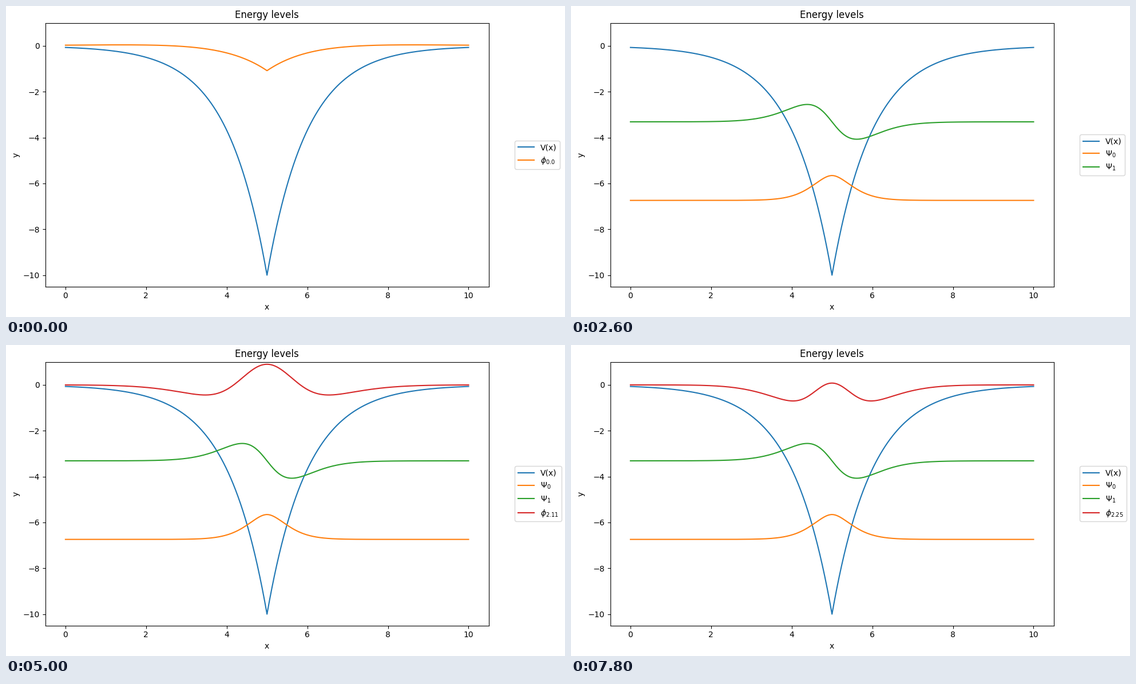
Write a matplotlib script that moves like this. It is 977x545 px and loops after 8000 ms.

```python
import numpy as np
import matplotlib.pyplot as plt
from matplotlib.animation import FuncAnimation

W, H, DPI = 977, 545, 100
FRAMES, STEP = 40, 200
STEPS = 7  # frames spent on each of the first two levels
MID = 5.0

x = np.linspace(0, 10, 501)
s = np.abs(x - MID)
V = -10 * np.exp(-s)


def bound_states(count):
    """Lowest eigenstates of -1/2 d2/dx2 + V in the box, left lobe positive."""
    h = x[1] - x[0]
    off = np.full(len(x) - 3, 0.5 / h**2)
    ham = np.diag(1 / h**2 + V[1:-1]) - np.diag(off, 1) - np.diag(off, -1)
    energy, vec = np.linalg.eigh(ham)
    states = np.zeros((count, len(x)))
    states[:, 1:-1] = vec[:, :count].T / np.sqrt(h)
    left = states[:, :len(x) // 2].sum(axis=1, keepdims=True)
    return energy, states * np.sign(left)


def bells(a, p, b, q):
    """Narrow bell minus a wide one: a central peak between two dips."""
    return a * np.exp(-s**2 / p) - b * np.exp(-s**2 / q)


def ease(u, rate):
    """Exponential ease: out for a positive rate, in for a negative one."""
    return (1 - np.exp(-rate * u)) / (1 - np.exp(-rate))


E, psi = bound_states(2)
guess = -1.2 * (np.exp(-s) - 0.1) * np.exp(-s**2 / 20)
odd_guess = 1.7 * (MID - x) * np.exp(-s)

# start step, shape, easing rate towards the next shape
KEYS = [
    (0, guess, 4),
    (6, bells(1.33, 0.47, 1.47, 1.95), -4.5),
    (11, bells(1.88, 0.835, 0.98, 4.1), 6),
    (18, bells(1.09, 0.372, 1.15, 2.45), 3),
    (25, bells(1.30, 0.422, 1.22, 2.52), 3),
]


def trial(level, k):
    """Trial wave function of a level after k iterations."""
    if level < 2:
        start, end = [(guess, -psi[0]), (odd_guess, psi[1])][level]
        return end + (start - end) * 0.42**k
    for (k0, a, rate), (k1, b, _) in zip(KEYS, KEYS[1:]):
        if k <= k1:
            return a + (b - a) * ease((k - k0) / (k1 - k0), rate)


fig = plt.figure(figsize=(W / DPI, H / DPI), dpi=DPI, facecolor="white")
ax = fig.add_axes([68.68 / W, 53.25 / H, 775 / W, 462 / H])
ax.set(xlim=(-0.5, 10.5), ylim=(-10.5, 1), xlabel="x", ylabel="y", title="Energy levels")
ax.plot(x, V, label="V(x)")
curves = [ax.plot(x, V)[0] for _ in range(3)]


def draw(frame):
    level = min(frame // STEPS, 2)
    k = frame - STEPS * level
    for i, curve in enumerate(curves):
        curve.set_visible(i <= level)
        if i > level:
            curve.set_label("_hidden")
        elif i < level or (level < 2 and k == STEPS - 1):
            curve.set_ydata(E[i] + psi[i])
            curve.set_label(rf"$\Psi_{i}$")
        else:
            curve.set_ydata(trial(i, k))
            curve.set_label(rf"$\phi_{{{i}.{k}}}$")
    ax.legend(loc="center left", bbox_to_anchor=(1.05, 0.5))
    return curves


anim = FuncAnimation(fig, draw, frames=FRAMES, interval=STEP, repeat=True,
                     repeat_delay=0, blit=False)
plt.show()
```
